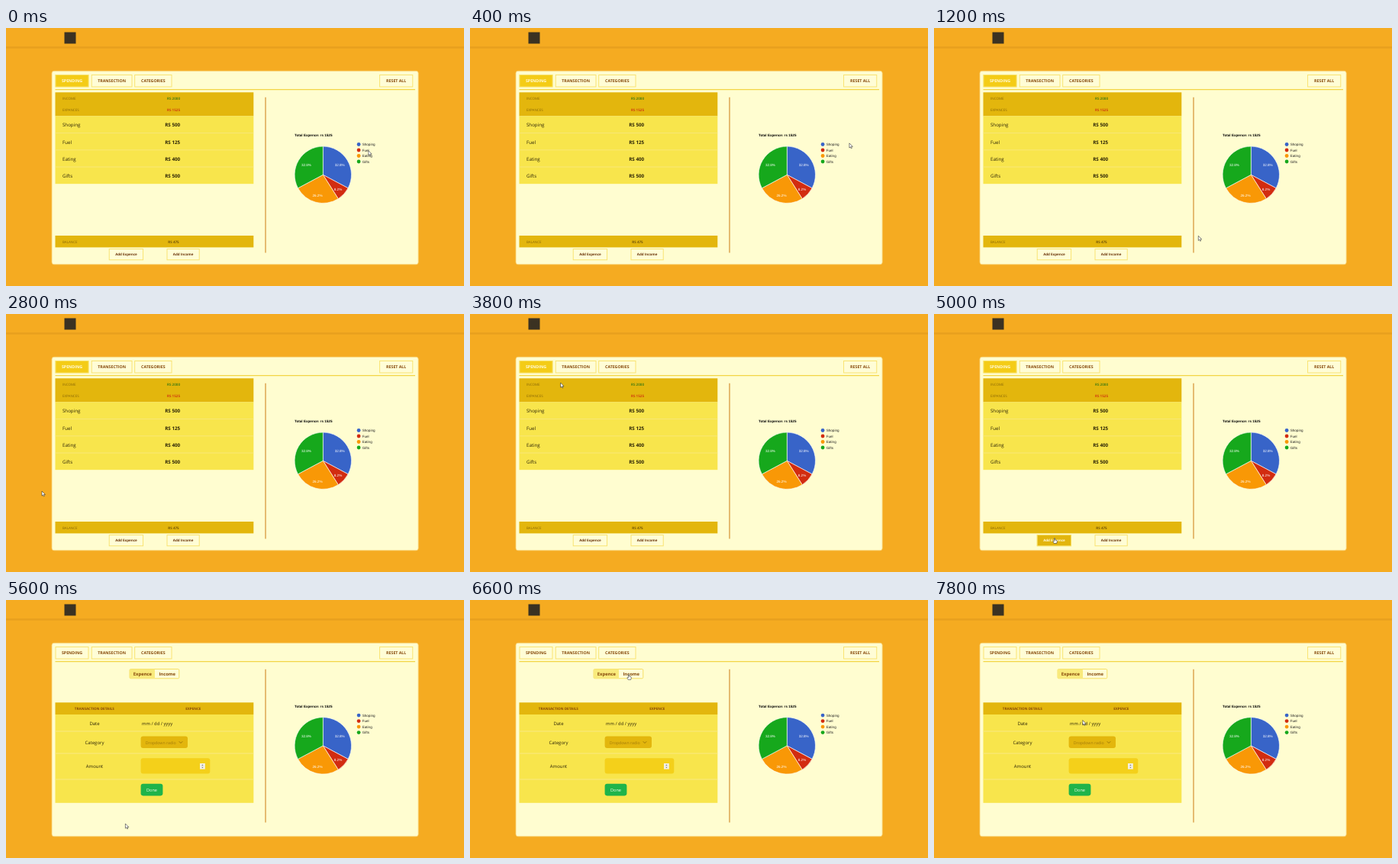
Recreate the animation shown at these times as an HTML page. Size 600 by 338 pixels, loop 8 s.

```html
<!DOCTYPE html>
<html lang="en">
<head>
<meta charset="utf-8">
<title>Spending tracker</title>
<style>
  html, body { margin: 0; width: 100%; height: 100%; overflow: hidden; background: #f5ab21; }
  svg { display: block; width: 100vw; height: 100vh; }
  text { font-family: "Open Sans", "Noto Sans", sans-serif; text-rendering: geometricPrecision; }
  .chart text { font-family: "Liberation Sans", Arial, sans-serif; font-size: 4.6px; }
</style>
</head>
<body>
<svg id="stage" viewBox="0 0 600 338"></svg>
<script>
const LOOP = 8000, STEP = 200, FORM_AT = 5600;
const C = {
  panel: '#fffdd0', gold: '#e3b60d', row: '#f8e54c', line: '#f5dc58', rule: '#f8e98a',
  brown: '#86490b', dim: '#8a6808', ink: '#2a2206', tan: '#dca552'
};
const stage = document.getElementById('stage');

function el(parent, tag, attrs, content) {
  const node = document.createElementNS('http://www.w3.org/2000/svg', tag);
  for (const key in attrs) node.setAttribute(key, attrs[key]);
  if (content) node.textContent = content;
  return parent.appendChild(node);
}
const group = (parent, attrs) => el(parent, 'g', attrs);
const box = (p, x, y, x2, y2, fill, more) =>
  el(p, 'rect', { x, y, width: x2 - x, height: y2 - y, fill, ...more });
const label = (p, str, x, y, size, fill, weight = 400, anchor = 'start') =>
  el(p, 'text', { x, y, 'font-size': size, fill, 'font-weight': weight, 'text-anchor': anchor }, str);
const hline = (p, x, x2, y, stroke, width) =>
  el(p, 'path', { d: `M${x} ${y}H${x2}`, stroke, 'stroke-width': width });

function button(p, str, x, y, x2, y2, size, fill = '#fffdd6', color = C.brown) {
  const g = group(p);
  box(g, x, y, x2, y2, fill, { stroke: '#f8e168', 'stroke-width': 0.9 });
  label(g, str, (x + x2) / 2, (y + y2) / 2 + size * 0.36, size, color, 700, 'middle');
  return g;
}

// Page frame
box(stage, 0, 0, 600, 338, '#f5ab21');
box(stage, 0, 24.6, 600, 25.6, '#db961c');
box(stage, 0, 25.6, 600, 27, '#eba31f');
box(stage, 76.5, 5.5, 91.5, 20.5, '#3b3222');
box(stage, 60, 56.3, 540.2, 309.8, C.panel, { rx: 3, stroke: '#f8cf6c', 'stroke-width': 0.8 });

button(stage, 'SPENDING', 65, 61.5, 108, 77, 5.25);
button(stage, 'TRANSECTION', 112.2, 61.5, 165, 77, 5.25);
button(stage, 'CATEGORIES', 168.7, 61.5, 217, 77, 5.25);
button(stage, 'RESET ALL', 489.6, 61.5, 532.8, 77, 5.25);
hline(stage, 64.5, 536, 80.6, '#f3d545', 1.2);
const divider = el(stage, 'path', { stroke: C.tan, 'stroke-width': 1.5 });

// Spending view
const spending = group(stage);
button(spending, 'SPENDING', 65, 61.5, 108, 77, 5.25, '#f4cc16', '#fffbe0');
box(spending, 64.5, 84.3, 324.3, 115.4, C.gold);
box(spending, 64.5, 115.4, 324.3, 204.2, C.row);
box(spending, 64.5, 272, 324.3, 287.4, C.gold);
[
  ['INCOME', 'RS 2000', 94, '#2c7414'],
  ['EXPANCES', 'RS 1525', 109.4, '#cc2412'],
  ['BALANCE', 'RS 475', 281.8, '#5c4208']
].forEach(([name, sum, y, color]) => {
  label(spending, name, 74, y, 4.5, C.dim);
  label(spending, sum, 219.5, y, 4.55, color, 600, 'middle');
});
[['Shoping', 500], ['Fuel', 125], ['Eating', 400], ['Gifts', 500]].forEach(([name, sum], i) => {
  const y = 129.3 + 22.2 * i;
  label(spending, name, 74, y, 6.15, C.ink);
  label(spending, 'RS ' + sum, 218.2, y, 6.25, C.ink, 700, 'middle');
  if (i) hline(spending, 64.5, 324.3, y - 13.9, C.rule, 0.7);
});
button(spending, 'Add Expence', 135.2, 289.6, 179.6, 303.8, 4.5, '#fffdd6', '#6b340a');
button(spending, 'Add Income', 211, 289.6, 253.2, 303.8, 4.5, '#fffdd6', '#6b340a');
const addHover = button(spending, 'Add Expence', 135.2, 289.6, 179.6, 303.8, 4.5, '#e2b50d', '#fffbe0');

// Entry form view
const form = group(stage);
box(form, 162, 90.5, 226.8, 102.8, '#fffdd6', { rx: 1.5, stroke: '#f5dc58', 'stroke-width': 0.9 });
box(form, 162, 90.5, 195, 102.8, '#f9ea7c', { rx: 1.5 });
label(form, 'Expence', 178.9, 98.7, 5.85, C.brown, 700, 'middle');
label(form, 'Income', 211.2, 98.7, 5.85, C.brown, 700, 'middle');
box(form, 64.5, 134.3, 324.3, 150, C.gold);
box(form, 64.5, 150, 324.3, 265.8, C.row);
label(form, 'TRANSACTION DETAILS', 115.8, 143.8, 4.6, C.brown, 700, 'middle');
label(form, 'EXPENCE', 245.3, 143.8, 4.55, C.brown, 700, 'middle');
[172, 201, 235].forEach(y => hline(form, 64.5, 324.3, y, C.rule, 0.9));
[['Date', 163.8], ['Category', 188.9], ['Amount', 220]].forEach(([name, y]) =>
  label(form, name, 116, y, 6, C.ink, 400, 'middle'));
label(form, 'mm / dd / yyyy', 178, 163.8, 5.85, C.ink);
const dropdown = box(form, 176.6, 178.6, 238, 194, C.gold, { rx: 3 });
label(form, 'Dropdown radio', 182.8, 188.5, 5.25, '#a27c0c');
el(form, 'path', { d: 'M226.8 185.3l2.2 2.2l2.2-2.2', fill: 'none', stroke: '#8a6808', 'stroke-width': 0.8 });
box(form, 176.6, 207.2, 267.3, 227.4, '#f4d01a', { rx: 3 });
box(form, 254, 214, 260.8, 221.6, '#f3f0e4');
el(form, 'path', { d: 'M256.2 217l1.2-1.4l1.2 1.4zM256.2 218.8l1.2 1.4l1.2-1.4z', fill: '#777' });
box(form, 176.6, 240.8, 205.4, 256.4, '#1fb44a', { rx: 3 });
label(form, 'Done', 191, 250.8, 5.6, '#f2ffe8', 400, 'middle');

// Pie chart
const chart = group(stage, { class: 'chart' });
const slices = [
  ['Shoping', 500, '#3864c8', 437.2, 181.2],
  ['Fuel', 125, '#d22c10', 435, 212.8],
  ['Eating', 400, '#f99806', 408, 221.4],
  ['Gifts', 500, '#16a81c', 393.4, 181.2]
];
const total = slices.reduce((sum, s) => sum + s[1], 0);
const rim = part => {
  const a = part * 2 * Math.PI;
  return `${415.3 + 37.2 * Math.sin(a)} ${192.3 - 37.2 * Math.cos(a)}`;
};
label(chart, 'Total Expence: rs ' + total, 378, 142, 4.6, '#000', 700);
let spent = 0;
slices.forEach(([name, sum, fill, x, y], i) => {
  const from = spent / total, to = (spent += sum) / total;
  el(chart, 'path', {
    d: `M415.3 192.3L${rim(from)}A37.2 37.2 0 0 1 ${rim(to)}Z`,
    fill, stroke: '#fff', 'stroke-width': 0.6
  });
  label(chart, (100 * sum / total).toFixed(1) + '%', x, y, 4.6, '#fff', 400, 'middle');
  const row = 152.5 + 7.5 * i;
  el(chart, 'circle', { cx: 462.1, cy: row, r: 2.4, fill });
  label(chart, name, 466.7, row + 1.6, 4.6, '#222');
});

// Pointers, tip at 0,0
const pointer = group(stage);
const arrow = el(pointer, 'path', {
  d: 'M0 0V6.2L1.4 4.9L2.4 7L3.4 6.5L2.5 4.5H4.4Z',
  fill: '#fff', stroke: '#222', 'stroke-width': 0.55, 'stroke-linejoin': 'round'
});
const hand = el(pointer, 'path', {
  d: 'M-.6 .4Q0-.5 .6 .4V2.6L2.9 3.2Q3.5 3.5 3.3 4.6L2.7 7H-.7L-2.3 4.6Q-2.2 3.6-.6 4.4Z',
  fill: '#fff', stroke: '#222', 'stroke-width': 0.55, 'stroke-linejoin': 'round'
});

// time, x, y
const path = [
  [0, 474.8, 160.6], [600, 508, 146], [1000, 508, 146], [1200, 346.3, 272.3],
  [1600, 154, 282], [1800, 154, 282], [2000, 47, 232], [3000, 47, 232],
  [3200, 12, 223], [3400, -10, 222], [3600, -10, 222], [3800, 118.6, 90],
  [4400, 512, 170], [4800, 319, 291], [5000, 158, 293.5], [5400, 158, 293.5],
  [5600, 156.4, 293], [6600, 208, 97.4], [7000, 216, 165], [7400, 209, 203],
  [7800, 194.8, 157.5], [8000, 194.8, 157.5]
];
function pointerAt(t) {
  const i = path.findIndex(p => p[0] > t);
  const [t0, x0, y0] = path[i - 1], [t1, x1, y1] = path[i];
  const k = (t - t0) / (t1 - t0);
  return [x0 + (x1 - x0) * k, y0 + (y1 - y0) * k];
}
const show = (node, on) => node.setAttribute('display', on ? 'inline' : 'none');
const inside = (x, y, l, t, r, b) => x > l && x < r && y > t && y < b;

function draw(now) {
  const t = Math.floor(now % LOOP / STEP) * STEP;
  const onForm = t >= FORM_AT;
  const [x, y] = pointerAt(t);
  const onAdd = !onForm && inside(x, y, 135, 289, 180, 304);
  const onMenu = onForm && inside(x, y, 176, 178, 238, 194);
  const onToggle = onForm && inside(x, y, 162, 90, 227, 103);

  show(spending, !onForm);
  show(form, onForm);
  show(addHover, onAdd);
  dropdown.setAttribute('fill', onMenu ? '#d0a20b' : C.gold);
  divider.setAttribute('d', onForm ? 'M340 90.8V291.5' : 'M340 90.8V294.6');
  chart.setAttribute('transform', `translate(0 ${onForm ? -1.4 : 0})`);
  pointer.setAttribute('transform', `translate(${x} ${y})`);
  const isHand = onAdd || onMenu || onToggle;
  show(hand, isHand);
  show(arrow, !isHand);
}

const start = performance.now();
function tick() {
  draw(performance.now() - start);
  requestAnimationFrame(tick);
}
tick();
</script>
</body>
</html>
```
